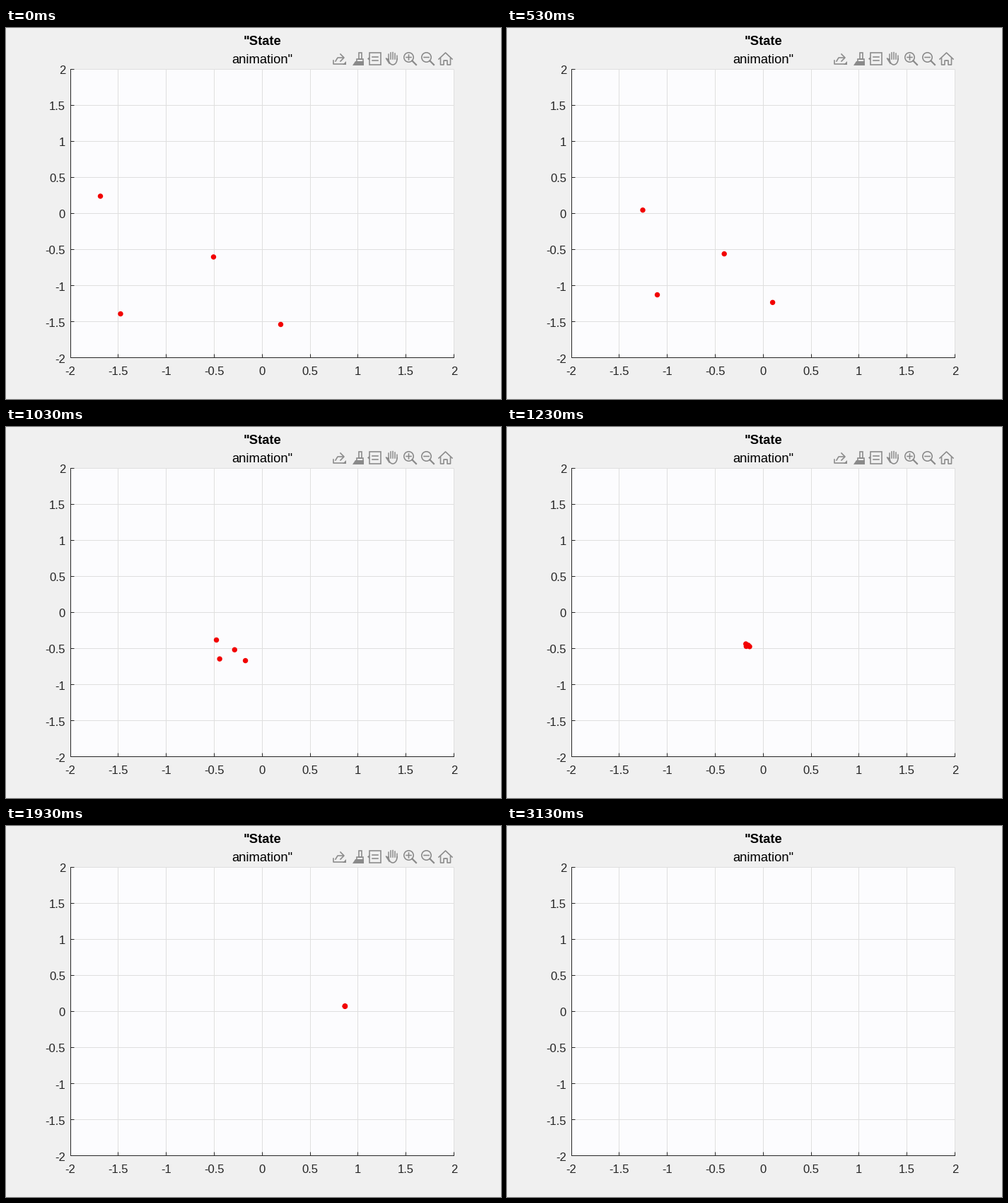
These frames come from a looping animation (700x525 px, 3.33 s). A matplotlib script:

```python
import numpy as np
import matplotlib.pyplot as plt
from matplotlib.animation import FuncAnimation
from matplotlib.patches import Circle, Polygon, Rectangle

W, H, DPI = 700, 525, 100
FRAMES, INTERVAL = 333, 10
PX = 72 / DPI  # points per pixel

BACK, PLOT, GRID = "#f0f0f0", "#fcfcfe", "#dfdfdf"
DARK, ICON, RED = "#262626", "#8a8a8a", "#f20000"
LEFT, RIGHT, TOP, BOTTOM = 91, 633.5, 58, 466.8

plt.rcParams["font.family"] = "Liberation Sans"
plt.rcParams["toolbar"] = "None"
fig = plt.figure(figsize=(W / DPI, H / DPI), dpi=DPI, facecolor=BACK)
ax = fig.add_axes([0, 0, 1, 1])
ax.set_xlim(0, W)
ax.set_ylim(H, 0)
ax.axis("off")


def line(points, color, width=1.0, **kw):
    xs, ys = zip(*points)
    return ax.plot(xs, ys, color=color, lw=width * PX, snap=False, **kw)[0]


def segments(pairs, color, **kw):
    """Draw separate segments as one broken line."""
    points = [p for a, b in pairs for p in (a, b, (np.nan, np.nan))]
    line(points, color, solid_capstyle="butt", **kw)


def label(x, y, s, size, ha="center", color=DARK, **kw):
    ax.text(x, y, s, fontsize=size * PX, ha=ha, va="baseline", color=color, **kw)


def draw_axes():
    ax.add_patch(Rectangle((LEFT, TOP), RIGHT - LEFT, BOTTOM - TOP, fc=PLOT, lw=0))
    ticks = np.linspace(-2, 2, 9)
    xs, ys = np.linspace(LEFT, RIGHT, 9), np.linspace(BOTTOM, TOP, 9)
    for v, x, y in zip(ticks, xs, ys):
        label(x, 491, f"{v:g}", 16.67)
        label(84, y + 7, f"{v:g}", 16.67, ha="right")
    # lines sit on pixel centres
    gx, gy = np.floor(xs) + 0.5, np.floor(ys) + 0.5
    x0, x1, y0, y1 = gx[0], gx[-1], gy[0], gy[-1]
    segments([((x, y0), (x, y1)) for x in gx], GRID)
    segments([((x0, y), (x1, y)) for y in gy], GRID)
    segments([((x, y0), (x, y0 - 5)) for x in gx], DARK)
    segments([((x0, y), (x0 + 5, y)) for y in gy], DARK)
    line([(x0, y1), (x0, y0), (x1, y0)], DARK, solid_joinstyle="miter")
    label(362.5, 24, '"State', 18.33, color="black", weight="bold")
    label(362.5, 50, 'animation"', 18.33, color="black")


icons = []


def stroke(*points, width=1.6):
    icons.append(line(points, ICON, width, zorder=3, solid_joinstyle="round"))


def add(patch):
    icons.append(ax.add_patch(patch))


def fill(*points):
    add(Polygon(points, fc=ICON, lw=0, zorder=3))


def box(x, y, w, h):
    add(Rectangle((x, y), w, h, fill=False, ec=ICON, lw=1.6 * PX, zorder=3))


def export_icon(x, y):
    stroke((x - 8, y + 3), (x - 8, y + 8), (x + 6, y + 8))
    stroke((x - 5, y + 4), (x - 2, y - 1), (x + 6, y - 1))
    stroke((x + 2, y - 6), (x + 7, y - 1), (x + 2, y + 4))
    fill((x + 5, y + 8.5), (x + 10, y + 8.5), (x + 10, y + 3.5))


def brush_icon(x, y):
    box(x + 2, y - 8.5, 4, 9)
    box(x - 1, y + 0.5, 9, 4)
    fill((x - 3, y + 4), (x + 8.5, y + 4), (x + 8.5, y + 9.5), (x - 7.5, y + 9.5))


def tip_icon(x, y):
    box(x - 7, y - 8, 16, 17)
    for dy in (-2, 3):
        stroke((x - 3, y + dy), (x + 5, y + dy))
    fill((x - 10, y + 0.5), (x - 7, y - 2), (x - 7, y + 3))


def hand_icon(x, y):
    for i in range(5):
        lift = 8.5 - 0.9 * (i - 1.7) ** 2
        stroke((x - 4 + 3 * i, y + 1), (x - 4 + 3 * i, y - lift), width=1.5)
    a = np.linspace(0, np.pi, 12)
    stroke(*zip(x + 2 + 6 * np.cos(a), y + 1 + 8 * np.sin(a)))
    stroke((x - 4, y + 2), (x - 7.5, y), (x - 3, y + 7))


def lens_icon(x, y, plus):
    add(Circle((x, y), 6.7, fill=False, ec=ICON, lw=1.6 * PX, zorder=3))
    stroke((x + 4.8, y + 4.8), (x + 10.5, y + 10.5), width=2.2)
    stroke((x - 3.5, y), (x + 3.5, y))
    if plus:
        stroke((x, y - 3.5), (x, y + 3.5))


def home_icon(x, y):
    stroke((x - 9.5, y + 1), (x, y - 8), (x + 9.5, y + 1))
    for side in (-1, 1):
        stroke((x + 7 * side, y), (x + 7 * side, y + 9),
               (x + 2.5 * side, y + 9), (x + 2.5 * side, y + 3), (x, y + 3))


def draw_toolbar():
    export_icon(471, 43)
    brush_icon(497, 43)
    tip_icon(521, 43)
    hand_icon(545, 43)
    lens_icon(569.5, 41.5, True)
    lens_icon(594.5, 41.5, False)
    home_icon(621.5, 43)


# Four agents gather on a shared centre that drifts off exponentially.
START = np.array([(133.5, 238), (162, 404.5), (293.5, 324), (388.5, 419.5)])
CENTRE = START.mean(axis=0)
DRIFT = np.array([38.0, -14.79])
MEET, LAST, FADE_END, FADE = 40, 72, 94, 3


def positions(k):
    centre = CENTRE + DRIFT * (np.exp(0.034 * k) - 1)
    s = min(k / MEET, 1) ** 1.15
    spread = 1 - s * s * (3 - 2 * s)
    return centre + (START - CENTRE) * spread


draw_axes()
draw_toolbar()
dots = [ax.add_patch(Circle((0, 0), 3.7, fc=RED, lw=0, zorder=4)) for _ in START]


def update(i):
    k = int((i * INTERVAL + 5) * 0.03)  # the scene advances 30 steps a second
    for dot, pos in zip(dots, positions(k)):
        dot.center = pos
        dot.set_visible(k < LAST)
    alpha = float(np.clip((FADE_END - k) / FADE, 0, 1))
    for part in icons:
        part.set_alpha(alpha)
    return dots + icons


ani = FuncAnimation(fig, update, frames=FRAMES, interval=INTERVAL,
                    init_func=lambda: update(0), repeat=True, repeat_delay=0)
plt.show()
```
